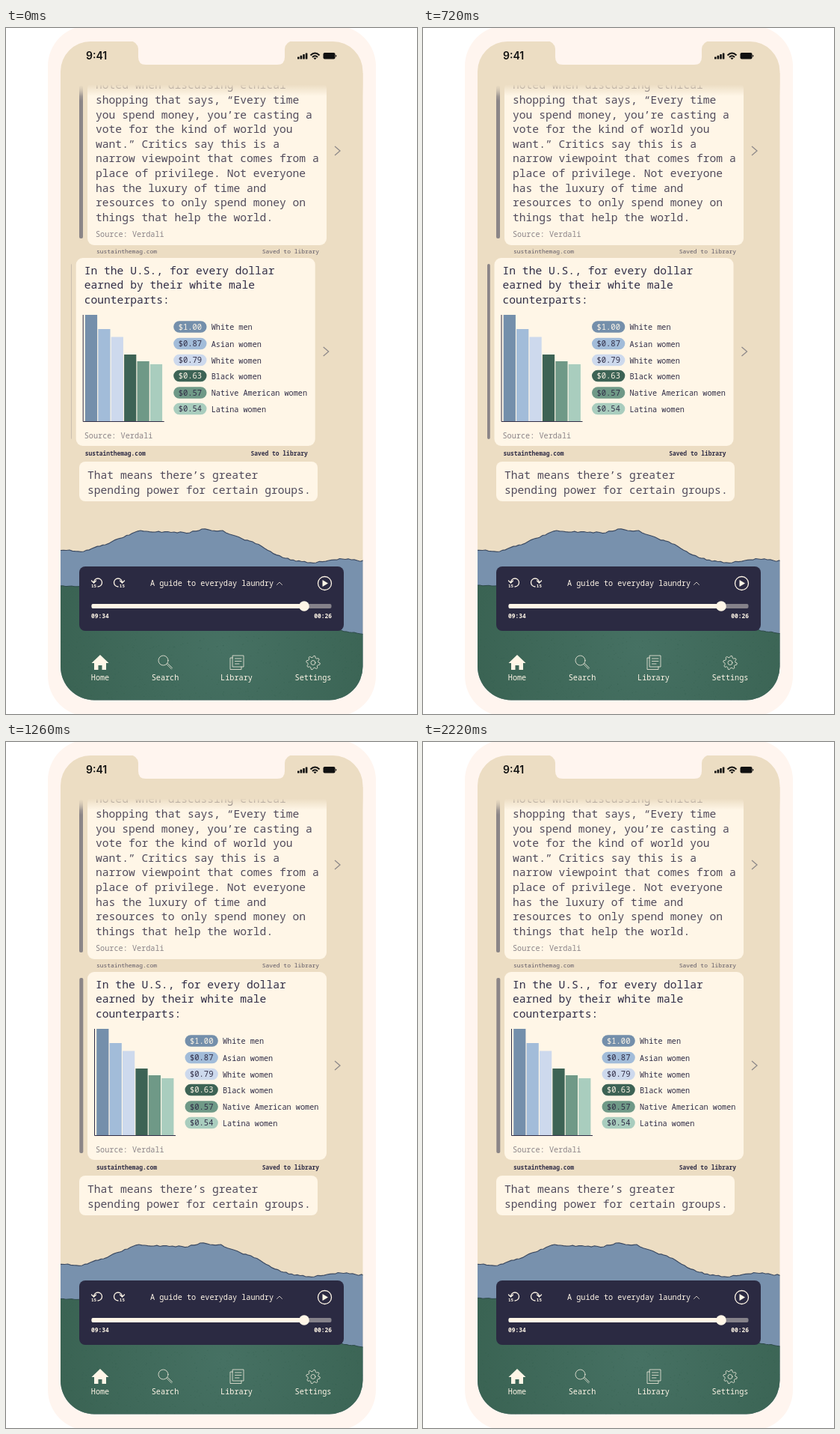
An HTML page for the animation above (2.25 s loop, 550x916 px).

```html
<!DOCTYPE html>
<html lang="en">
<head>
<meta charset="utf-8">
<title>Reading app</title>
<style>
html, body { margin: 0; width: 100%; height: 100%; overflow: hidden; background: #fff; }
svg { display: block; width: 550px; height: 916px; }
text { font-family: "Noto Sans Mono", "DejaVu Sans Mono", monospace; white-space: pre; }
.body { font-size: 14.65px; fill: #504a5b; }
.head { font-size: 14.65px; fill: #302d46; }
.src { font-size: 10.2px; fill: #8b8488; }
.tiny { font-size: 7.95px; fill: #5f5966; }
.strong { font-size: 7.95px; font-weight: 600; fill: #302d46; }
.label { font-size: 10.2px; font-weight: 500; fill: #302d46; }
.pill { font-size: 10.5px; font-weight: 500; }
.skip { font-size: 6px; font-weight: 600; }
.light { fill: #fff6e7; }
.clock { font: 600 14px Inter, sans-serif; fill: #111; }
.line, .thin { fill: none; stroke: #fff6e7; stroke-width: 1.3; stroke-linecap: round; stroke-linejoin: round; }
.thin { stroke-width: .75; }
.chev { fill: none; stroke: #8f8a8a; stroke-width: 1.3; }
</style>
</head>
<body>
<svg viewBox="0 0 550 916">
  <defs>
    <clipPath id="screen">
      <path d="M113 18H437.500A40 40 0 0 1 477.500 58V852.500A45 45 0 0 1 432.500 897.500H118A45 45 0 0 1 73 852.500V58A40 40 0 0 1 113 18Z"/>
    </clipPath>
    <linearGradient id="fade" x1="0" y1="0" x2="0" y2="1">
      <stop offset=".5" stop-color="#ecddc3"/>
      <stop offset="1" stop-color="#ecddc3" stop-opacity="0"/>
    </linearGradient>
    <linearGradient id="barFade" x1="0" y1="0" x2="0" y2="1">
      <stop offset="0" stop-color="#8b8587" stop-opacity=".35"/>
      <stop offset=".1" stop-color="#8b8587"/>
    </linearGradient>
    <radialGradient id="grass" gradientUnits="userSpaceOnUse" cx="290" cy="828" r="225">
      <stop offset="0" stop-color="#467163"/>
      <stop offset="1" stop-color="#3a6353"/>
    </radialGradient>
  </defs>
  <rect x="56" y="-3" width="439" height="922" rx="54" fill="#fff5ef"/>
  <g clip-path="url(#screen)">
    <rect x="73" y="18" width="405" height="880" fill="#ecddc3"/>
    <g id="feed"></g>
    <rect x="73" y="60" width="405" height="31" fill="url(#fade)"/>
    <g id="card"></g>
    <g id="last"></g>
    <path id="hill" fill="#7891ad" stroke="#3b4960" stroke-width="1.200"/>
    <g id="ground">
      <path id="grassEdge" fill="url(#grass)" stroke="#2d4a48" stroke-width="1"/>
      <path id="grain" fill="none" stroke="#2f5a4b" stroke-width="1" opacity=".3"/>
    </g>
    <g id="player"></g>
    <g id="nav"></g>
  </g>
  <path d="M165 17H385Q374 18 373 28V39Q373 49 363 49H187Q177 49 177 39V28Q176 18 165 17Z" fill="#fff5ef"/>
  <g id="status"></g>
</svg>
<script>
const LOOP = 2250;
const $ = id => document.getElementById(id);
const clamp = v => Math.min(1, Math.max(0, v));

const text = (x, y, cls, str, anchor = 'start') =>
  `<text x="${x}" y="${y}" class="${cls}" text-anchor="${anchor}">${str}</text>`;
const box = (x, y, w, h, r, fill, id = '') =>
  `<rect ${id && `id="${id}"`} x="${x}" y="${y}" width="${w}" height="${h}" rx="${r}" fill="${fill}"/>`;
const path = (d, cls) => `<path class="${cls}" d="${d}"/>`;
const circle = (x, y, r, cls) => `<circle cx="${x}" cy="${y}" r="${r}" class="${cls}"/>`;
const lines = (x, y, cls, list) =>
  list.map((s, i) => text(x, y + i * 19.6, cls, s)).join('');
const chevron = y => path(`M440 ${y - 6}L447 ${y}L440 ${y + 6}`, 'chev');
const caption = (y, cls) =>
  text(121, y, cls, 'sustainthemag.com') + text(419, y, cls, 'Saved to library', 'end');

const CREAM = '#fff6e7';
const INK = '#302d46';
const source = 'Source: Verdali';

$('feed').innerHTML =
  box(98, 77, 5, 204, 2, 'url(#barFade)') +
  box(109, 72, 320, 218, 9, CREAM) +
  lines(120, 81.4, 'body', [
    'noted when discussing ethical',
    'shopping that says, “Every time',
    'you spend money, you’re casting a',
    'vote for the kind of world you',
    'want.” Critics say this is a',
    'narrow viewpoint that comes from a',
    'place of privilege. Not everyone',
    'has the luxury of time and',
    'resources to only spend money on',
    'things that help the world.'
  ]) +
  text(120, 279, 'src', source) + caption(301, 'tiny') + chevron(164);

// value, label, colour, bar top, pill centre, pill text colour
const groups = [
  ['$1.00', 'White men', '#748fab', 383, 399, CREAM],
  ['$0.87', 'Asian women', '#a2bcd9', 402, 421.5, INK],
  ['$0.79', 'White women', '#cdd9ed', 412.5, 443.5, INK],
  ['$0.63', 'Black women', '#3d6355', 436, 464.5, CREAM],
  ['$0.57', 'Native American women', '#6f9987', 445, 487, INK],
  ['$0.54', 'Latina women', '#a9cdbe', 449, 508.5, INK]
];

$('card').innerHTML =
  box(98, 315, 5, 234, 2, '#8b8587', 'marker') +
  box(109, 307, 320, 251, 9, CREAM) +
  lines(120, 328.5, 'head', [
    'In the U.S., for every dollar',
    'earned by their white male',
    'counterparts:'
  ]) +
  groups.map(([value, name, color, top, y, ink], i) =>
    box(121.2 + i * 17.4, top, 16.2, 525 - top, 0, color) +
    box(239.5, y - 7.8, 44.3, 15.6, 7.8, color) +
    `<text x="261.7" y="${y + 3.8}" class="pill" fill="${ink}" text-anchor="middle">${value}</text>` +
    text(290, y + 4, 'label', name)).join('') +
  `<path d="M118.500 383V525.500H227" fill="none" stroke="${INK}"/>` +
  text(120, 547.5, 'src', source) + caption(571, 'strong') + chevron(432);

$('last').innerHTML =
  box(98, 579, 319, 53, 8, CREAM) +
  lines(109, 602, 'body', ['That means there’s greater', 'spending power for certain groups.']);

const skip = 'M-4.500 0A5.500 5.500 0 1 1 1 5.500M-7.500 -2.500L-4.500 .5L-1.500 -2.500';
$('player').innerHTML =
  box(98, 719, 354, 86, 8, '#2b2a42') +
  `<g transform="translate(122 740.500)">${path(skip, 'line')}</g>` +
  `<g transform="translate(151 740.500) scale(-1 1)">${path(skip, 'line')}</g>` +
  text(114, 747, 'skip light', '15') + text(159, 747, 'skip light', '15', 'end') +
  text(193, 745, 'label light', 'A guide to everyday laundry') +
  path('M362.500 743.500L366 740L369.500 743.500', 'thin') +
  circle(426.5, 741.5, 9, 'line') +
  path('M423.500 737L431 741.500L423.500 746Z', 'light') +
  box(114.5, 769, 321, 6, 2, '#85828a') + box(114.5, 769, 286, 6, 2, CREAM) +
  circle(399, 772, 6.8, 'light') +
  text(114, 788, 'strong light', '09:34') + text(436, 788, 'strong light', '00:26', 'end');

const gear = () => {
  let d = '';
  for (let i = 0; i < 32; i++) {
    const a = (i + .5) * Math.PI / 16, r = i % 4 < 2 ? 9.2 : 7;
    d += (i ? 'L' : 'M') + (411 + r * Math.cos(a)).toFixed(1) + ' ' + (847.5 + r * Math.sin(a)).toFixed(1);
  }
  return d + 'Z';
};
$('nav').innerHTML =
  path('M126 837L137.500 848H134V857H128.500V851H123.500V857H118V848H114.500Z', 'light') +
  circle(210.5, 844.5, 6.5, 'thin') +
  path('M215 849.500L221.500 856M216.500 848.500L222.500 854.500', 'thin') +
  path('M303.500 838H318V853H303.500ZM303.500 841H300V856.500H315V853M306.500 842H315M306.500 845.500H315M306.500 849H312', 'thin') +
  path(gear(), 'thin') + circle(411, 847.5, 3, 'thin') +
  [['Home', 126], ['Search', 213], ['Library', 308.5], ['Settings', 411]]
    .map(([s, x]) => text(x, 871, 'label light', s, 'middle')).join('');

$('status').innerHTML =
  text(107, 42, 'clock', '9:41') +
  [3, 4.7, 6.4, 8].map((h, i) => box(390 + i * 3.6, 41.5 - h, 2.6, h, .6, '#111')).join('') +
  `<g fill="none" stroke="#111" stroke-width="2">
    <path d="M407.500 36.500Q413.500 30.500 419.500 36.500M410 39Q413.500 35.500 417 39"/></g>
  <path d="M411.500 40.300Q413.500 38.800 415.500 40.300L413.500 42.300Z" fill="#111"/>` +
  box(424.5, 33, 16, 8.5, 2, '#111') + box(441, 36, 1.2, 2.6, .6, '#111');

function seeded(seed) {
  return () => (seed = (seed * 16807) % 2147483647) / 2147483647;
}

// Torn-paper edge: straight segments broken into small random steps.
function torn(points, seed, rough) {
  const rnd = seeded(seed);
  let d = '';
  points.forEach(([x, y], i) => {
    d += (i ? 'L' : 'M-9 940L') + `${x} ${y}`;
    const next = points[i + 1];
    if (!next) return;
    const n = Math.max(1, Math.round((next[0] - x) / 4));
    for (let k = 1; k < n; k++) {
      const u = k / n;
      d += `L${(x + (next[0] - x) * u).toFixed(1)} ${(y + (next[1] - y) * u + (rnd() - .5) * rough).toFixed(1)}`;
    }
  });
  return d + 'L560 940Z';
}

$('hill').setAttribute('d', torn([
  [60, 696], [85, 697], [104, 699], [115, 695], [133, 690], [150, 682], [165, 677],
  [180, 671], [200, 673], [225, 673], [246, 674], [262, 669], [275, 671], [290, 671],
  [303, 677], [316, 682], [330, 686], [342, 692], [354, 699], [370, 707], [388, 712],
  [415, 714], [432, 711], [450, 709], [462, 710], [490, 713]
], 41, 2));
$('grassEdge').setAttribute('d', torn([
  [60, 745], [100, 745.5], [440, 803], [456, 806], [466, 807], [490, 811]
], 7, 1.4));

function grain(step) {
  const rnd = seeded(100 + step * 37);
  let d = '';
  for (let i = 0; i < 420; i++) {
    d += `M${(70 + rnd() * 412).toFixed(1)} ${(812 + rnd() * 90).toFixed(1)}h1.2`;
  }
  return d;
}
const grains = Array.from({ length: 5 }, (_, i) => grain(i));

const ease = u => u < .5 ? 4 * u ** 3 : 1 - 4 * (1 - u) ** 3;
const marker = $('marker');
let shown = -1;

function draw(now) {
  const t = now % LOOP;
  const slide = ease(clamp((t - 590) / 420));
  $('card').setAttribute('transform', `translate(${(-15.3 * (1 - slide)).toFixed(2)} 0)`);

  const grow = clamp((t - 580) / 200);
  const width = 1 + 4 * grow;
  marker.setAttribute('x', 103.3 - width);
  marker.setAttribute('width', width);
  marker.setAttribute('opacity', .35 + .65 * Math.min(1, 2 * grow));

  const drift = t / LOOP;
  $('hill').setAttribute('transform', `translate(${-4 * drift} 0)`);
  $('ground').setAttribute('transform', `translate(0 ${-2.5 * drift})`);
  const step = Math.floor(t / 90) % grains.length;
  if (step !== shown) $('grain').setAttribute('d', grains[shown = step]);
}

let start;
function tick(now) {
  start ??= now;
  draw(now - start);
  requestAnimationFrame(tick);
}
draw(0);
requestAnimationFrame(tick);
</script>
</body>
</html>
```
